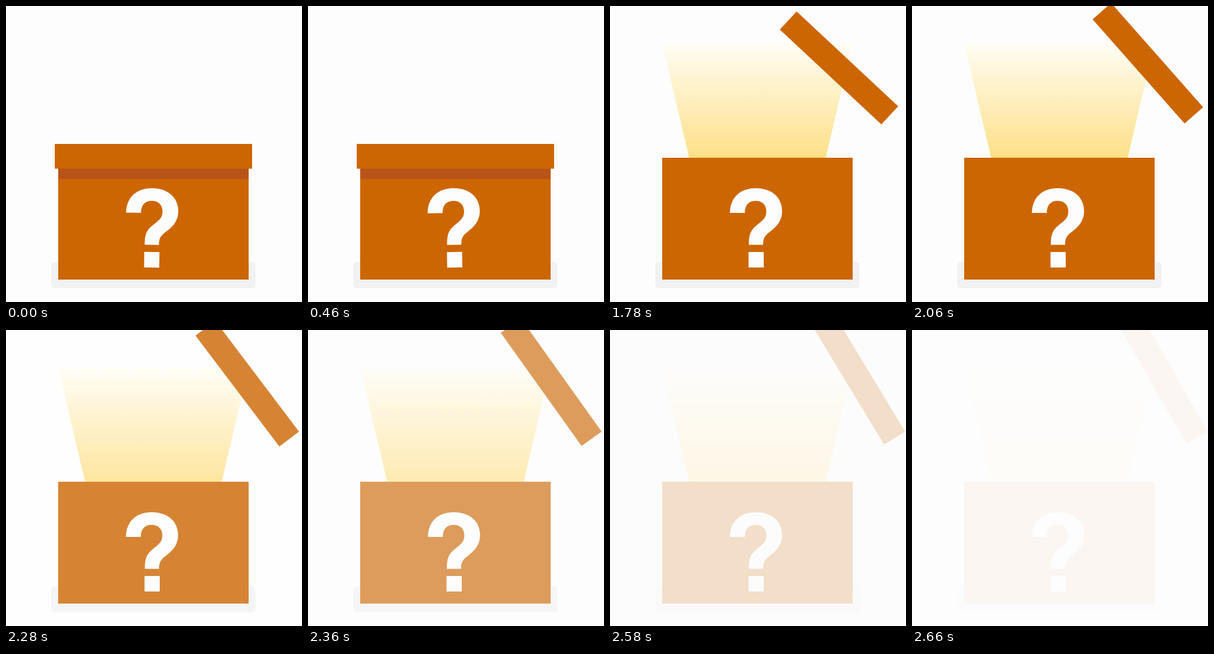
Animation of 516x515 px, one loop 2.76 s. Source, as an HTML page with a canvas:

```html
<!DOCTYPE html>
<html lang="en">
<head>
<meta charset="utf-8">
<title>Mystery box</title>
<style>
  html, body { margin: 0; width: 100%; height: 100%; overflow: hidden; background: #fdfdfd; }
  canvas { display: block; width: 516px; height: 515px; }
</style>
</head>
<body>
<canvas id="stage" width="516" height="515" role="img" aria-label="A box with a question mark: ?"></canvas>
<script>
const ctx = document.getElementById('stage').getContext('2d');
const W = 516, H = 515, LOOP = 2760;
const PAPER = '#fdfdfd', ORANGE = '#cc6602', SHADE = '#b85419', FLOOR = '#f2f2f2';
const OPEN = 1780, LAST = 2660;
const MARK_X = 254.5, MARK_Y = 386;

const mark = new Path2D(`
  M209 360 C209.5 333 227 317 254 317 C282 317 300 333 300 357
  C300 371 293 382 281 391 C269 400 267 404 267 415.5 L242 415.5
  C242 398 245 390 255 382 C266 373 272.5 369 272.5 357.5
  C272.5 346 265 339 254 339 C242 339 235 346 235 360 Z
  M241.5 428 H268 V455 H241.5 Z`);

const clamp = (v, lo, hi) => Math.min(hi, Math.max(lo, v));

function rect(color, x, y, w, h) {
  ctx.fillStyle = color;
  ctx.fillRect(x, y, w, h);
}

// Two linear swings to and fro, 5 degrees each way, then rest.
function tilt(t) {
  const p = (t + 17) / 500;
  if (p >= 2) return 0;
  const q = (p + 0.25) % 1;
  return 5 * (1 - Math.abs(4 * q - 2));
}

function drawMark(deg) {
  ctx.save();
  ctx.translate(MARK_X, MARK_Y);
  ctx.rotate(deg * Math.PI / 180);
  ctx.translate(-MARK_X, -MARK_Y);
  ctx.fillStyle = PAPER;
  ctx.fill(mark);
  ctx.restore();
}

function drawBeam() {
  const g = ctx.createLinearGradient(0, 65, 0, 264);
  g.addColorStop(0, '#fffdf5');
  g.addColorStop(1, '#fee088');
  ctx.fillStyle = g;
  ctx.beginPath();
  ctx.moveTo(91, 65);
  ctx.lineTo(423, 65);
  ctx.lineTo(376, 264);
  ctx.lineTo(138, 264);
  ctx.fill();
}

function drawFlyingLid(dt) {
  ctx.save();
  ctx.translate(399.2 + 0.0427 * dt, 107.8 - 0.0291 * dt);
  ctx.rotate((43 + 0.0197 * dt) * Math.PI / 180);
  rect(ORANGE, -121, -21.5, 242, 43);
  ctx.restore();
}

function draw(t) {
  const open = t >= OPEN;
  rect(PAPER, 0, 0, W, H);

  ctx.fillStyle = FLOOR;
  ctx.beginPath();
  ctx.roundRect(79, 445.5, 356, 45.5, 6);
  ctx.fill();

  if (open) drawBeam();
  rect(ORANGE, 91, 264, 332, 212);
  if (open) {
    drawFlyingLid(t - OPEN);
  } else {
    rect(SHADE, 91, 283, 332, 18);
    rect(ORANGE, 85, 240, 344, 43);
  }
  drawMark(tilt(t));

  // Fade the whole scene into the paper.
  ctx.globalAlpha = clamp((t - 2182) / 500, 0, 1);
  rect(PAPER, 0, 0, W, H);
  ctx.globalAlpha = 1;
}

let start = null;
function tick(now) {
  if (start === null) start = now;
  draw(Math.min(Math.max(0, now - start) % LOOP, LAST));
  requestAnimationFrame(tick);
}
draw(0);
requestAnimationFrame(tick);
</script>
</body>
</html>
```
